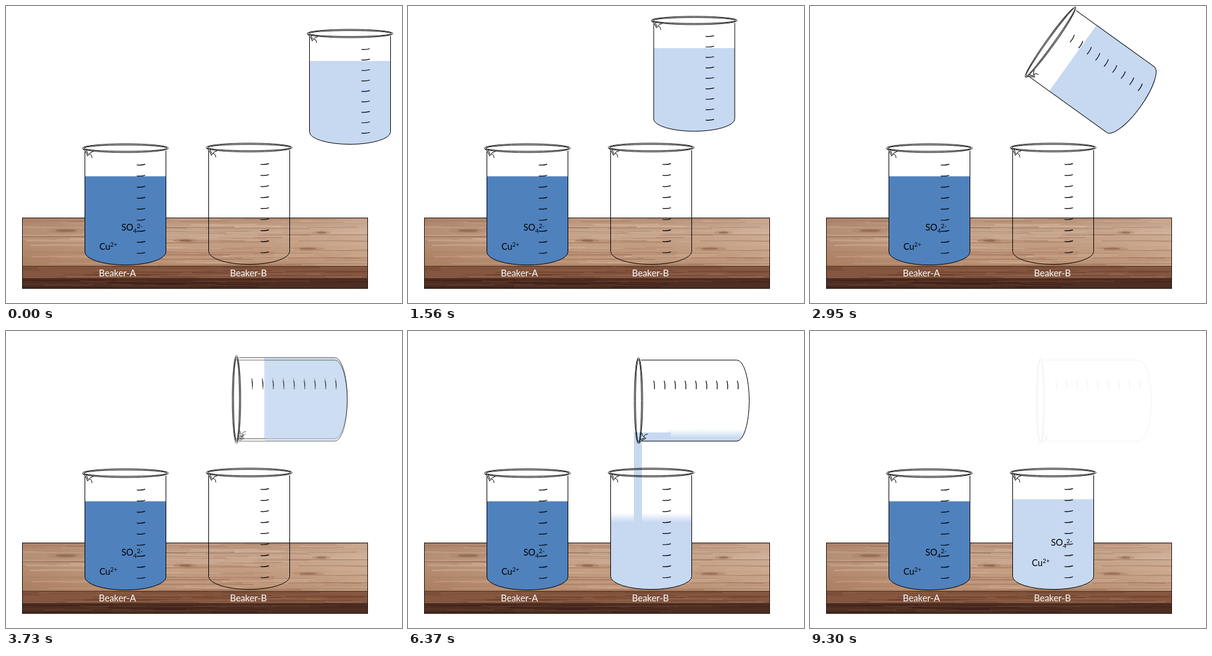
Write an HTML page that moves like this. It is 640 by 480 pixels and loops after 9.36 s.

```html
<!DOCTYPE html>
<html lang="en">
<head>
<meta charset="utf-8">
<title>Pouring between beakers</title>
<style>
  html, body { margin: 0; width: 100%; height: 100%; overflow: hidden; background: #fff; }
  svg { display: block; width: 100%; height: 100%; }
  text { font-family: Lato, "Open Sans", sans-serif; }
  .ion { font-size: 14.4px; }
  .ion .small { font-size: 9.8px; }
  .name { font-size: 14.8px; fill: #fff; }
  .glass path, .glass ellipse { fill: none; stroke: #000; stroke-width: 1; vector-effect: non-scaling-stroke; }
  .glass .tick { stroke-width: 1.2; }
</style>
</head>
<body>
<svg id="stage" viewBox="0 0 640 480">
  <defs>
    <linearGradient id="top" x1="0" y1="0" x2="0" y2="1">
      <stop offset="0" stop-color="#b78f77"/>
      <stop offset=".22" stop-color="#c6a58e"/>
      <stop offset=".55" stop-color="#c5a085"/>
      <stop offset="1" stop-color="#b98e70"/>
    </linearGradient>
    <linearGradient id="shade">
      <stop offset="0" stop-color="#8a5a3c" stop-opacity=".3"/>
      <stop offset=".45" stop-color="#8a5a3c" stop-opacity="0"/>
      <stop offset="1" stop-color="#e2c9b4" stop-opacity=".25"/>
    </linearGradient>
    <clipPath id="tableClip"><rect x="26" y="343" width="559" height="114"/></clipPath>
  </defs>
  <g id="table" clip-path="url(#tableClip)"></g>
  <rect x="26.5" y="342.5" width="558" height="114" fill="none" stroke="#1b100b"/>
  <g id="scene"></g>
  <text class="name" x="150" y="437">Beaker-A</text>
  <text class="name" x="362" y="437">Beaker-B</text>
</svg>
<script>
const LOOP = 9360, DARK = '#4f81bd', LIGHT = '#c6d9f1';
const $ = id => document.getElementById(id);
const clamp = v => Math.min(1, Math.max(0, v));
const part = (t, a, b) => clamp((t - a) / (b - a));
const mix = (a, b, p) => a + (b - a) * p;
const smooth = p => p < .5 ? 2 * p * p : 1 - 2 * (1 - p) ** 2;
const set = (id, attrs) => {
  for (const k in attrs) $(id).setAttribute(k, attrs[k]);
};

// Wood: three bands with seeded grain
let seed = 11;
const rnd = () => (seed = seed * 16807 % 2147483647) / 2147483647;

function grain(n, y0, y1, colors, opacity) {
  let out = '';
  for (let i = 0; i < n; i++) {
    const x = rnd() * 560 - 20, y = mix(y0, y1, rnd()), len = 40 + rnd() * 160;
    const bend = rnd() * 4 - 2, c = colors[Math.floor(rnd() * colors.length)];
    out += `<path d="M${x.toFixed(1)},${y.toFixed(1)}q${(len / 2).toFixed(1)},${bend.toFixed(1)} ${len.toFixed(1)},0"` +
      ` fill="none" stroke="${c}" stroke-width="${(.5 + rnd() * 1.5).toFixed(1)}" opacity="${opacity}"/>`;
  }
  return out;
}

const knot = (x, y, rx, ry) =>
  `<ellipse cx="${x}" cy="${y}" rx="${rx}" ry="${ry}" fill="#7c5039" opacity=".55"/>` +
  `<ellipse cx="${x}" cy="${y}" rx="${rx * 1.9}" ry="${ry * 2}" fill="#8d6047" opacity=".22"/>`;

$('table').innerHTML =
  `<rect x="26" y="343" width="559" height="78" fill="url(#top)"/>` +
  `<rect x="26" y="343" width="559" height="78" fill="url(#shade)"/>` +
  grain(120, 344, 419, ['#8d6048', '#a2775c', '#dfc5b0', '#d6b69c'], .42) +
  knot(97, 363, 17, 2) + knot(290, 379, 10, 2) + knot(510, 366, 8, 1.5) + knot(488, 392, 14, 1.5) +
  `<rect x="26" y="420" width="559" height="21" fill="#855740"/>` +
  grain(36, 421, 440, ['#5c3627', '#a87959', '#734733'], .5) +
  `<rect x="26" y="440" width="559" height="17" fill="#4e2e23"/>` +
  grain(26, 442, 456, ['#301913', '#70452f'], .5) +
  `<path d="M26,420.5H585M26,441H585" stroke="#3b2119" opacity=".7"/>`;

// Beaker drawn around its own centre, 140 by 186
function beaker(id, place, fill, level) {
  let ticks = '';
  for (let i = 0; i < 9; i++)
    ticks += `<path class="tick" d="M18.5,${(-60.3 + i * 16.9).toFixed(1)}q8,.8 13.5,-1.2"/>`;
  return `<g id="${id}" class="glass" transform="${place}">
    <path style="stroke:none;fill:${fill}" d="M-65.5,${level}H65.5V73A65.5,20 0 0 1 -65.5,73Z"/>
    <path d="M-65.5,-81V73A65.5,20 0 0 0 65.5,73V-82"/>
    <ellipse cy="-86" rx="69.5" ry="6.7"/>
    <ellipse cy="-86" rx="67" ry="4.8"/>
    <path d="M-69,-85L-65,-82L-61,-74L-57,-79L-52,-81M-63,-83L-60.5,-76.5M-58,-77q4,1 4,6"/>
    ${ticks}</g>`;
}

const fade = id => `<linearGradient id="${id}" gradientUnits="userSpaceOnUse" x1="0" x2="0">
  <stop offset="0" stop-color="${LIGHT}"/><stop offset="1" stop-color="${LIGHT}" stop-opacity="0"/></linearGradient>`;

const ions = (id, sx, sy, cx, cy) => `<g id="${id}" class="ion">
  <text x="${sx}" y="${sy}">SO<tspan class="small" dy="4">4</tspan><tspan class="small" dy="-8.5">2-</tspan></text>
  <text x="${cx}" y="${cy}">Cu<tspan class="small" dy="-5">2+</tspan></text></g>`;

$('scene').innerHTML =
  fade('drain') + fade('fill') + fade('flow') +
  `<path id="stream" fill="url(#flow)" d="M425,164H365V408H378V178H425Z"/>` +
  beaker('a', 'translate(193 320.5) scale(1 1.055)', DARK, -43) +
  beaker('b', 'translate(393 319.5) scale(1 1.055)', 'url(#fill)', -45) +
  beaker('mover', '', LIGHT, -41.5) +
  beaker('tilted', 'translate(458.5 112.5) rotate(-90)', 'url(#drain)', -39.5) +
  ions('ionsA', 186.5, 363, 151, 394) + ions('ionsB', 389.5, 347, 358.5, 380);

const localB = y => (y - 319.5) / 1.055;

function draw(t) {
  const go = smooth(part(t, 20, 1820));
  const turn = -90 * part(t, 1900, 3640);
  set('mover', {
    transform: `translate(${mix(556, 458.5, go)} ${mix(130.5, 108.5, go)}) rotate(${turn})`,
    opacity: 1 - part(t, 3640, 3920)
  });
  set('tilted', { opacity: part(t, 3640, 3800) * (1 - part(t, 8940, 9320)) });

  const low = mix(47, 193, part(t, 4050, 6735));
  set('drain', { x1: 112.5 - low, x2: 127.5 - low });

  const rise = mix(432, 272, part(t, 4650, 6890));
  set('fill', { y1: localB(rise), y2: localB(rise - 15) });

  const starting = t < 6000;
  const edge = starting ? mix(163, 428, part(t, 3880, 4700)) : mix(163, 428, part(t, 6660, 9400));
  set('flow', starting ? { y1: edge - 20, y2: edge } : { y1: edge, y2: edge - 12 });
  set('stream', { opacity: t > 3880 && t < 7930 ? 1 : 0 });
  set('ionsB', { opacity: part(t, 6950, 7400) });
}

// The picture advances in 60 ms steps
function frame(now) {
  const t = now % LOOP, shift = t > 1900 && t < 8900 ? 10 : 0;
  draw(Math.floor((t - shift) / 60) * 60 + shift);
  requestAnimationFrame(frame);
}
const begin = performance.now();
draw(0);
requestAnimationFrame(function tick() {
  frameStart();
});
function frameStart() {
  const loop = () => {
    const t = Math.max(0, performance.now() - begin) % LOOP;
    const shift = t > 1900 && t < 8900 ? 10 : 0;
    draw(Math.floor((t - shift) / 60) * 60 + shift);
    requestAnimationFrame(loop);
  };
  loop();
}
</script>
</body>
</html>
```
